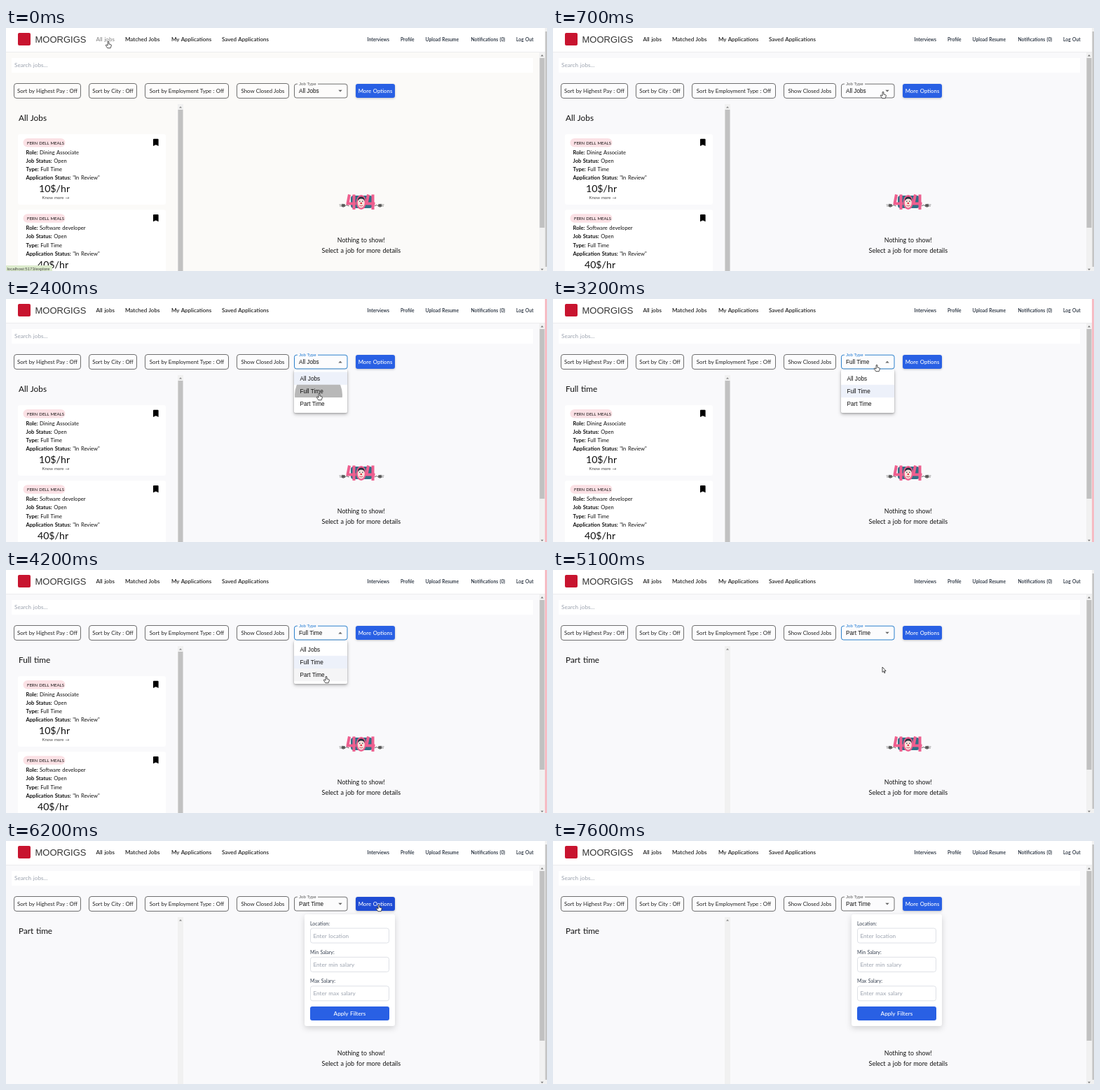
An HTML page for the animation above (8.2 s loop, 772 by 348 pixels).

```html
<!DOCTYPE html>
<html lang="en">
<head>
<meta charset="utf-8">
<title>Job board</title>
<style>
html, body { margin: 0; width: 100%; height: 100%; overflow: hidden; background: #fff; }
svg { display: block; width: 772px; height: 348px; }
text { font-family: Lato, sans-serif; font-size: 8.2px; word-spacing: .6px; fill: #111; white-space: pre; }
.sans { font-family: "Liberation Sans", Arial, sans-serif; word-spacing: 0; }
.nav { font-size: 8px; font-weight: 500; }
.side { font-size: 6.8px; font-weight: 600; fill: #1f2937; }
.mid { text-anchor: middle; }
.hint { fill: #9ca3af; }
.filter { font-size: 7.8px; word-spacing: .3px; fill: #222; }
.white { fill: #fff; font-weight: 500; }
.row { font-size: 7.6px; }
.b { font-weight: 700; }
.outline { fill: #fff; fill-opacity: .5; stroke: #333; stroke-width: .7; }
.lift { filter: drop-shadow(0 1px 1.5px rgba(0, 0, 0, .22)); }
.float { filter: drop-shadow(0 1px 1px rgba(0, 0, 0, .2)) drop-shadow(0 2px 2.5px rgba(0, 0, 0, .25)); }
.soft { filter: drop-shadow(0 3px 4px rgba(0, 0, 0, .16)); }
</style>
</head>
<body>
<svg id="stage" viewBox="0 0 772 348" xmlns="http://www.w3.org/2000/svg"></svg>
<script>
const LOOP = 8200, STEP = 100;
const BLUE = [41, 96, 228], NAVY = [31, 76, 212];

const rect = (x, y, w, h, fill, extra = '') =>
  `<rect x="${x}" y="${y}" width="${w}" height="${h}" fill="${fill}" ${extra}/>`;
const text = (x, y, str, cls = '', extra = '') =>
  `<text x="${x}" y="${y}" class="${cls}" ${extra}>${str}</text>`;
const path = (d, fill, extra = '') => `<path d="${d}" fill="${fill}" ${extra}/>`;

const header = () => {
  const links = [[128.5, 'All jobs', 'id="home"'], [170, 'Matched Jobs'], [236, 'My Applications'], [308, 'Saved Applications']];
  const side = [[515.5, 'Interviews'], [563, 'Profile'], [598.5, 'Upload Resume'], [663.5, 'Notifications (0)'], [728, 'Log Out']];
  return rect(0, 34, 769, 1, '#ececee') + rect(0, 0, 769, 34, '#fff') +
    rect(17, 7, 18, 18, '#c8142f', 'rx="2"') +
    text(41.5, 21, 'MOORGIGS', 'sans', 'style="font-size:13px;fill:#333"') +
    links.map(([x, s, id]) => text(x, 19.3, s, 'nav', id)).join('') +
    side.map(([x, s]) => text(x, 18.8, s, 'side')).join('');
};

const filters = () => {
  const boxes = [[11.5, 95, 'Sort by Highest Pay : Off'], [118.5, 68, 'Sort by City : Off'],
    [198.5, 119, 'Sort by Employment Type : Off'], [329.5, 74, 'Show Closed Jobs']];
  return rect(8, 43, 744, 21, '#fff') + text(12, 56.3, 'Search jobs...', 'hint') +
    boxes.map(([x, w, s]) => rect(x, 79.5, w, 21, '#fff', 'rx="3.5" class="outline"') +
      text(x + w / 2, 93, s, 'filter mid')).join('');
};

const card = (y, role, pay, payX) => `<g transform="translate(0 ${y})">` +
  rect(17, 0, 211, 101, '#fff', 'rx="3"') +
  rect(24.5, 6, 60, 12.5, '#fbe1e5', 'rx="6.2"') +
  text(30, 14.6, 'FERN DELL MEALS', '', 'style="font-size:6px"') +
  path('M210 7.8q0-1 1-1h5.6q1 0 1 1V17l-3.8-1.7L210 17z', '#000') +
  [['Role:', role], ['Job Status:', 'Open'], ['Type:', 'Full Time'], ['Application Status:', '"In Review"']]
    .map(([k, v], i) => text(28.5, 29 + i * 12.15, `<tspan class="b">${k}</tspan> ${v}`, 'row')).join('') +
  text(payX, 83.3, pay, 'mid', 'style="font-size:14.2px"') +
  text(51.5, 93.3, 'Know more →', '', 'style="font-size:6px;fill:#444"') + '</g>';

const scrollbars = () =>
  rect(245, 109, 8, 239, '#f1f1f1') + path('M247 114.5h4l-2-2.3z', '#888') +
  rect(245.5, 117, 7, 231, '#c1c1c1', 'id="listThumb"') +
  rect(761, 35, 8, 313, '#f1f1f1') + rect(761.5, 43, 7, 243, '#c1c1c1') +
  path('M763 40.5h4l-2-2.5zM763 344.8h4l-2 2.3z', '#777') +
  rect(769, 0, 3, 348, '#f1f1f1') + rect(769.5, 5, 2.5, 337, '#c4c4c4') +
  rect(769, 0, 3, 348, '#f6bcc4', 'id="gutter"');

const empty = () => {
  const four = dx => `<path transform="translate(${dx} 0)" d="M490 238.5L487.5 251.5H499.5M496.5 238.500V260" fill="none" stroke="#ee5f8f" stroke-width="4" stroke-linejoin="round"/>`;
  const plug = s => `<g transform="translate(507.5 254) scale(${s} 1)">` +
    path('M18 1q4-3 6 0t5-1', 'none', 'stroke="#444" stroke-width=".8"') +
    path('M24-1.4l4-.4v3.600l-4-.4zM28-1h4M28 1h3.500', '#555', 'stroke="#555" stroke-width=".6"') + '</g>';
  return rect(492, 240, 31, 18, '#2f6f86', 'rx="4"') + plug(-1) + plug(1) + four(0) + four(27) +
    '<ellipse cx="506.800" cy="249.500" rx="7" ry="10.500" fill="#ee5f8f"/>' +
    '<ellipse cx="506.800" cy="250" rx="5" ry="7.500" fill="#f8e4dc"/>' +
    path('M501.800 248q0-6.500 5-6.500t5 6.500q-1.500-3.500-5-3.500t-5 3.500z', '#27313f') +
    '<g fill="#27313f"><circle cx="504.800" cy="248.300" r=".8"/><circle cx="508.800" cy="248.300" r=".8"/></g>' +
    '<circle cx="506.800" cy="251" r="1.300" fill="#d92c3e"/>' +
    path('M504.300 254q2.500 2 5 0', 'none', 'stroke="#b3283c" stroke-width=".8"') +
    text(506.8, 307.3, 'Nothing to show!', 'mid', 'style="font-size:8.8px"') +
    text(506.8, 321.6, 'Select a job for more details', 'mid', 'style="font-size:9px"');
};

const select = () =>
  path('M416 80.200h-1.500q-3 0-3 3V97q0 3 3 3H484q3 0 3-3V83.200q0-3-3-3H445', '#fff', 'id="field" fill-opacity=".5"') +
  text(418, 82.3, 'Job Type', 'sans', 'id="label" style="font-size:6.1px"') +
  text(418, 93, '', 'sans', 'id="value"') +
  path('M474.3 88.8h5.4L477 91.600z', '#666', 'id="caret"');

const menu = () => '<g id="menu">' + rect(411, 101, 76, 62, '#fff', 'rx="2" class="float"') +
  rect(411, 104.5, 76, 18.3, '#edf1fa', 'id="chosen"') + rect(411, 141, 76, 18.3, '#f5f5f6', 'id="hover"') +
  '<clipPath id="rowClip"><rect id="clipBox" x="411" width="76" height="18.3"/></clipPath>' +
  '<g clip-path="url(#rowClip)"><circle id="ripple" fill="#000" fill-opacity=".28"/></g>' +
  ['All Jobs', 'Full Time', 'Part Time'].map((s, i) => text(419.5, 116.5 + i * 18.3, s, 'sans')).join('') + '</g>';

const panel = () => '<g id="panel">' + rect(426, 105, 129, 160, '#fff', 'rx="3" class="soft"') +
  [['Location:', 'location'], ['Min Salary:', 'min salary'], ['Max Salary:', 'max salary']].map(([k, v], i) => {
    const y = i * 41.4;
    return text(434, 120.5 + y, k, '', 'style="font-size:7px;fill:#374151"') +
      rect(434.5, 125 + y, 112, 21, '#fff', 'rx="3" stroke="#d6dae0" stroke-width=".8"') +
      text(438.5, 138.5 + y, 'Enter ' + v, 'hint');
  }).join('') + rect(434, 237, 113, 20, `rgb(${BLUE})`, 'rx="3"') + text(490.5, 250, 'Apply Filters', 'white mid') + '</g>';

const pointer = () => '<g id="pointer" stroke="#222" stroke-width=".8" stroke-linejoin="round">' +
  path('M-.9.8Q0-.4.9.8V4l2.4.5q1.2.3 1 1.5L3.7 8.2 3.2 9.7H-1.2L-3.5 6.3q-.6-1.1.4-1.3l2.2 1.1z', '#fff', 'id="hand"') +
  path('M0 0V7.4L1.7 5.9 2.9 8.6 4 8.1 2.8 5.5H5.1Z', '#fff', 'id="arrow"') + '</g>';

stage.innerHTML = rect(0, 0, 772, 348, '#f9f9fb', 'id="back"') + header() + filters() +
  text(18, 133, '', '', 'id="title" style="font-size:11.8px"') +
  '<g id="cards">' + card(152, 'Dining Associate', '10$/hr', 69) + card(260.3, 'Software developer', '40$/hr', 67) + '</g>' +
  scrollbars() + empty() + select() +
  rect(499, 80, 56, 20, '', 'id="more" rx="3" class="lift"') + text(527, 93, 'More Options', 'white mid', 'style="font-size:7.8px"') +
  menu() + panel() +
  '<g id="status">' + rect(0, 340, 66, 8, '#dcebcd') +
  text(1.5, 346.5, 'localhost:5173/explore', 'sans', 'style="font-size:6.1px;fill:#444"') + '</g>' + pointer();

const el = Object.fromEntries([...stage.querySelectorAll('[id]')].map(n => [n.id, n]));
const set = (id, attrs) => { for (const k in attrs) el[id].setAttribute(k, attrs[k]); };
const show = (id, on) => set(id, { opacity: +on });

// Steps hold their value; tracks glide between points.
const held = (steps, t) => steps.filter(s => s[0] <= t).pop()[1];
const glide = (track, t) => {
  const i = track.findIndex(p => p[0] > t);
  if (i < 0) return track[track.length - 1].slice(1);
  const a = track[i - 1], b = track[i], u = (t - a[0]) / (b[0] - a[0]), e = u * u * (3 - 2 * u);
  return a.slice(1).map((v, k) => v + (b[k + 1] - v) * e);
};

const move = [[0, 146, 19], [100, 146, 19], [700, 471, 91], [1600, 471, 91], [1900, 447, 135], [2500, 447, 135],
  [2800, 462, 94], [3600, 462, 94], [4200, 457, 152], [4800, 457, 152], [5100, 470, 139], [5200, 470, 139], [5900, 532, 91]];
const hand = [[0, 1], [200, 0], [700, 1], [2600, 0], [2800, 1], [4900, 0], [5700, 1]];
const value = [[0, 'All Jobs'], [2500, 'Full Time'], [4800, 'Part Time']];
const title = [[0, 'All Jobs'], [2600, 'Full time'], [4900, 'Part time']];
const menuFade = [[0, 0], [1400, .6], [1500, 1], [2500, .7], [2600, .3], [2700, 0], [3000, .5], [3100, 1],
  [4800, .7], [4900, .3], [5000, 0]];
const opened = [[0, 0], [1400, 1], [2500, 0], [3000, 1], [4800, 0]];
const ripple = [[0, 0], [2400, 34], [2500, 46], [2700, 0], [4700, 34], [4800, 46], [5000, 0]];
const panelFade = [[0, 0], [6000, .6], [6100, 1]];
const dark = [[0, 0], [5800, .5], [5900, 1], [7500, .4], [7600, 0]];

function draw(t) {
  const [x, y] = glide(move, t), open = held(opened, t), fade = held(menuFade, t);
  const focus = t >= 1400 && t < 6000, later = t >= 3000, tint = held(dark, t);

  set('back', { fill: t < 400 ? '#fbfaf8' : '#f9f9fb' });
  el.home.style.fill = t < 200 ? '#8a8a8a' : '#111';
  show('status', t < 400);
  el.title.textContent = held(title, t);
  el.value.textContent = held(value, t);
  show('cards', t < 4900);
  show('listThumb', t < 4900);
  show('gutter', fade > 0);

  set('field', { stroke: focus ? '#2a80cc' : '#333', 'stroke-width': focus ? 1 : .7 });
  el.label.style.fill = focus ? '#1976d2' : '#555';
  set('caret', { transform: open ? 'rotate(180 477 90.2)' : '' });

  show('menu', fade);
  set('chosen', { y: later ? 122.8 : 104.5 });
  show('hover', t >= 4000);
  set('clipBox', { y: later ? 141 : 122.8 });
  set('ripple', { cx: later ? 457 : 446, cy: later ? 155 : 137, r: held(ripple, t) });

  show('panel', held(panelFade, t));
  set('more', { fill: `rgb(${BLUE.map((c, i) => Math.round(c + (NAVY[i] - c) * tint))})` });

  set('pointer', { transform: `translate(${x} ${y})` });
  show('pointer', t < 7500);
  show('hand', held(hand, t));
  show('arrow', !held(hand, t));
}

const start = performance.now();
(function tick() {
  const t = (performance.now() - start) % LOOP;
  draw(Math.floor(t / STEP) * STEP);
  requestAnimationFrame(tick);
})();
</script>
</body>
</html>
```
